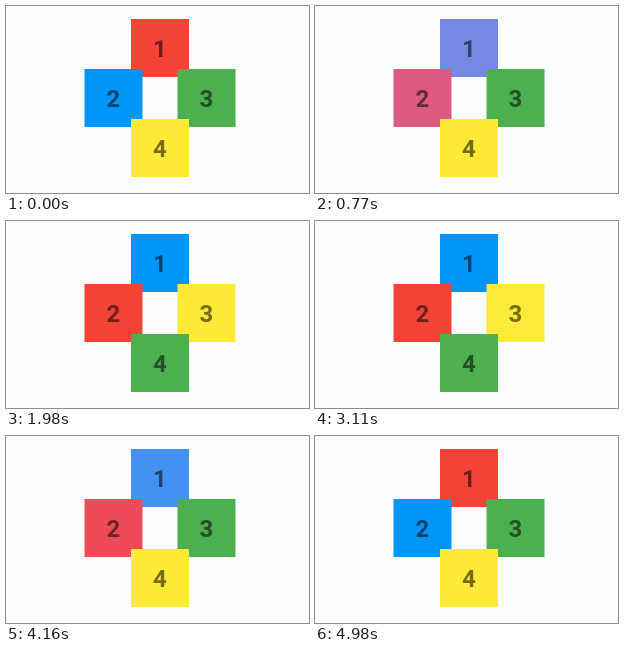
Write an HTML page with a canvas that moves like this. It is 303x187 px and loops after 5.03 s.

```html
<!DOCTYPE html>
<html lang="en">
<head>
<meta charset="utf-8">
<title>Colour swap</title>
<style>
  html, body { margin: 0; width: 100%; height: 100%; overflow: hidden; background: #f9fcf9; }
  canvas { display: block; }
</style>
</head>
<body>
<canvas id="stage"></canvas>
<script>
const W = 303, H = 187, LOOP = 5030;
const SIZE = 58, SWAP = 950;
const FORWARD = 100, BACK = 3055;

const RED = [244, 67, 54];
const BLUE = [0, 149, 248];
const GREEN = [76, 175, 80];
const YELLOW = [255, 234, 56];

const canvas = document.getElementById('stage');
const ctx = canvas.getContext('2d');
const scale = window.devicePixelRatio || 1;
canvas.width = Math.round(W * scale);
canvas.height = Math.round(H * scale);
canvas.style.width = W + 'px';
canvas.style.height = H + 'px';
ctx.scale(scale, scale);

const ease = x => 0.5 - 0.5 * Math.cos(Math.PI * Math.min(1, Math.max(0, x)));
const progress = (t, start) => ease((t - start) / SWAP);

// Colours are blended in linear light.
const toLinear = v => {
  v /= 255;
  return v <= 0.04045 ? v / 12.92 : Math.pow((v + 0.055) / 1.055, 2.4);
};
const toByte = v =>
  Math.round(255 * (v <= 0.0031308 ? v * 12.92 : 1.055 * Math.pow(v, 1 / 2.4) - 0.055));

function mix(a, b, k) {
  const rgb = a.map((v, i) => toByte(toLinear(v) * (1 - k) + toLinear(b[i]) * k));
  return `rgb(${rgb.join(',')})`;
}

function tile(label, x, y, color) {
  ctx.fillStyle = color;
  ctx.fillRect(x, y, SIZE, SIZE);
  ctx.fillStyle = 'rgba(0,0,0,0.54)';
  ctx.fillText(label, x + SIZE / 2, y + 38);
}

function draw(t) {
  const top = progress(t, FORWARD) - progress(t, BACK + SWAP);
  const bottom = progress(t, FORWARD + SWAP) - progress(t, BACK);

  ctx.fillStyle = '#f9fcf9';
  ctx.fillRect(0, 0, W, H);
  ctx.font = 'bold 24px Roboto, sans-serif';
  ctx.textAlign = 'center';
  ctx.textBaseline = 'alphabetic';

  tile('1', 125, 13, mix(RED, BLUE, top));
  tile('2', 78.5, 63, mix(BLUE, RED, top));
  tile('3', 171.5, 63, mix(GREEN, YELLOW, bottom));
  tile('4', 125, 113, mix(YELLOW, GREEN, bottom));
}

const begin = performance.now();
function frame() {
  draw((performance.now() - begin) % LOOP);
  requestAnimationFrame(frame);
}
frame();
</script>
</body>
</html>
```
